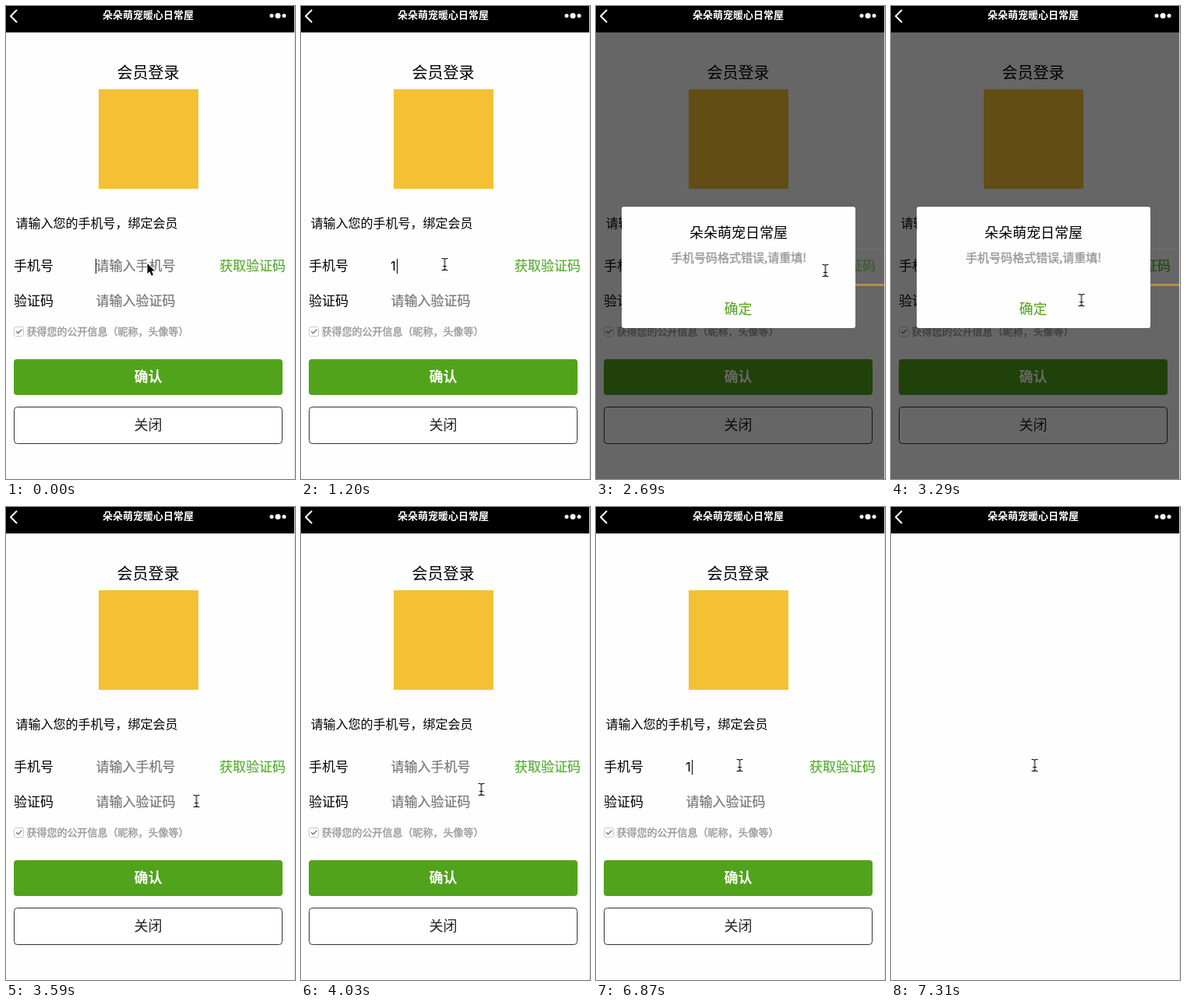
Write an HTML page that moves like this. It is 371 by 608 pixels and loops after 8 s.

```html
<!DOCTYPE html>
<html lang="zh-CN">
<head>
<meta charset="utf-8">
<title>会员登录</title>
<style>
html, body { margin: 0; width: 100%; height: 100%; overflow: hidden; background: #fefefe; }
svg { display: block; width: 371px; height: 608px; }
text { font: 17px "Noto Sans CJK SC", "Noto Sans CJK", sans-serif; white-space: pre; }
.mid { text-anchor: middle; }
.bar { font-size: 13px; font-weight: 700; fill: #fff; }
.h1 { font-size: 20px; }
.lead { font-size: 16px; }
.hint { fill: #757575; stroke: #757575; stroke-width: .2; }
.link { fill: #5aac34; stroke: #5aac34; stroke-width: .2; }
.note { font-size: 13px; fill: #999; stroke: #999; stroke-width: .4; }
.btn { font-size: 18px; }
.strong { font-weight: 700; fill: #fff; }
.msg { font-size: 15px; fill: #999; stroke: #999; stroke-width: .4; }
.num { font-family: Inter, Roboto, sans-serif; font-size: 16.5px; }
.line { fill: none; stroke-linecap: round; stroke-linejoin: round; }

/* Every change is a hard cut on one shared 8 s clock */
.a { animation: 8s step-end infinite; }
.page { animation-name: page; }
.ph { animation-name: ph; }
.d1 { animation-name: d1; }
.d2 { animation-name: d2; }
.d3 { animation-name: d3; }
.caret { animation-name: caret; }
.modal { animation-name: modal; }
.flash { animation-name: flash; }
.arrow { animation-name: arrow; }
.beam { animation-name: beam; }

@keyframes page { 0% { opacity: 1 } 91.375%, 100% { opacity: 0 } }
@keyframes ph { 0% { opacity: 1 } 15% { opacity: 0 } 33.625% { opacity: 1 } 85.875%, 100% { opacity: 0 } }
@keyframes d1 { 0% { opacity: 0 } 15% { opacity: 1 } 33.625% { opacity: 0 } 85.875%, 100% { opacity: 1 } }
@keyframes d2 { 0% { opacity: 0 } 18.75% { opacity: 1 } 33.625%, 100% { opacity: 0 } }
@keyframes d3 { 0% { opacity: 0 } 22.375% { opacity: 1 } 33.625%, 100% { opacity: 0 } }
@keyframes caret {
  0% { opacity: 1; transform: translate(115px) }
  15% { opacity: 1; transform: translate(123px) }
  18.75% { opacity: 1; transform: translate(133px) }
  22.375% { opacity: 1; transform: translate(141px) }
  33.625% { opacity: 0; transform: translate(115px) }
  55.875% { opacity: 1; transform: translate(115px) }
  85.875%, 100% { opacity: 1; transform: translate(123px) }
}
@keyframes modal { 0% { opacity: 0 } 33.625% { opacity: 1 } 44.875%, 100% { opacity: 0 } }
@keyframes flash { 0% { opacity: 1 } 35.5%, 100% { opacity: 0 } }
@keyframes arrow { 0% { opacity: 1 } 7.5%, 100% { opacity: 0 } }
@keyframes beam {
  0% { opacity: 0; transform: translate(184.5px, 332px) }
  7.5% { opacity: 1; transform: translate(184.5px, 332px) }
  26.125% { opacity: 1; transform: translate(271.5px, 337px) }
  28% { opacity: 1; transform: translate(294.5px, 340px) }
  39.25% { opacity: 1; transform: translate(263.5px, 362px) }
  41.125% { opacity: 1; transform: translate(244.5px, 378px) }
  50.375% { opacity: 1; transform: translate(231.5px, 363px) }
  52.25% { opacity: 1; transform: translate(192.5px, 336px) }
  54.125%, 100% { opacity: 1; transform: translate(184.5px, 332px) }
}
</style>
</head>
<body>
<svg viewBox="0 0 371 608">
  <defs>
    <path id="ibeam" d="M-3.5-7.5h1.5q2 0 2 2v11q0 2-2 2h-1.5M3.5-7.5h-1.5q-2 0-2 2M3.5 7.5h-1.5q-2 0-2-2M-2 2.5h4"/>
  </defs>
  <rect width="371" height="608" fill="#fefefe"/>

  <g class="a page">
    <text class="mid h1" x="182.5" y="93">会员登录</text>
    <rect x="119" y="107" width="128" height="128" fill="#f4c135"/>
    <text class="lead" x="12.5" y="285">请输入您的手机号，绑定会员</text>

    <text x="10" y="340">手机号</text>
    <text class="hint a ph" x="115.5" y="340">请输入手机号</text>
    <text class="num a d1" x="115" y="340">1</text>
    <text class="num a d2" x="122.5" y="340">2</text>
    <text class="num a d3" x="133" y="340">1</text>
    <rect class="a caret" y="325" width="1" height="19"/>
    <text class="link" x="274" y="340">获取验证码</text>

    <text x="10" y="385">验证码</text>
    <text class="hint" x="115.5" y="385">请输入验证码</text>

    <rect x="10.5" y="412.5" width="12" height="12" rx="2" fill="#fff" stroke="#c8c8c8"/>
    <path class="line" d="M13.5 418.5l2 2.2 4.5-4.7" stroke="#5f8a6c" stroke-width="1.4"/>
    <text class="note" x="26.5" y="423">获得您的公开信息（昵称，头像等）</text>

    <rect x="10" y="454" width="345" height="46" rx="4" fill="#51a31b"/>
    <text class="mid btn strong" x="182.5" y="483">确认</text>
    <rect x="10.5" y="515.5" width="344" height="47" rx="4" fill="#fff" stroke="#333"/>
    <text class="mid btn" x="182.5" y="545" fill="#222">关闭</text>
  </g>

  <g class="a modal">
    <rect y="34" width="370" height="574" opacity=".6"/>
    <rect x="333" y="312" width="37" height="1" fill="#727272"/>
    <rect x="333" y="357" width="37" height="3" fill="#b18d48"/>
    <text class="a flash" x="325" y="340" fill="#48603b">证码</text>
    <rect x="33" y="258" width="300" height="156" rx="3" fill="#fefefe"/>
    <text class="mid btn" x="183" y="298">朵朵萌宠日常屋</text>
    <text class="mid msg" x="183" y="329">手机号码格式错误,请重填!</text>
    <text class="mid btn" x="182.5" y="396" fill="#51a31b">确定</text>
  </g>

  <rect width="370" height="34"/>
  <path class="line" d="M13.5 5.5L6 13l7.5 7.5" stroke="#fff" stroke-width="2"/>
  <text class="mid bar" x="182.5" y="16">朵朵萌宠暖心日常屋</text>
  <g fill="#fff">
    <circle cx="341" cy="12.5" r="2.5"/>
    <circle cx="349" cy="12.5" r="3.5"/>
    <circle cx="357" cy="12.5" r="2.5"/>
  </g>
  <rect x="370" width="1" height="608" fill="#dedede"/>

  <g class="a arrow">
    <path transform="translate(181.5 331)" d="M0 0v13l3-2.8 2.2 5.2 2.3-1-2.2-5h4z" stroke="#fff" stroke-width="1.6" paint-order="stroke"/>
  </g>
  <g class="a beam">
    <use class="line" href="#ibeam" stroke="#fff" stroke-width="2.6" opacity=".7"/>
    <use class="line" href="#ibeam" stroke="#000" stroke-width="1.1"/>
  </g>
</svg>
</body>
</html>
```
